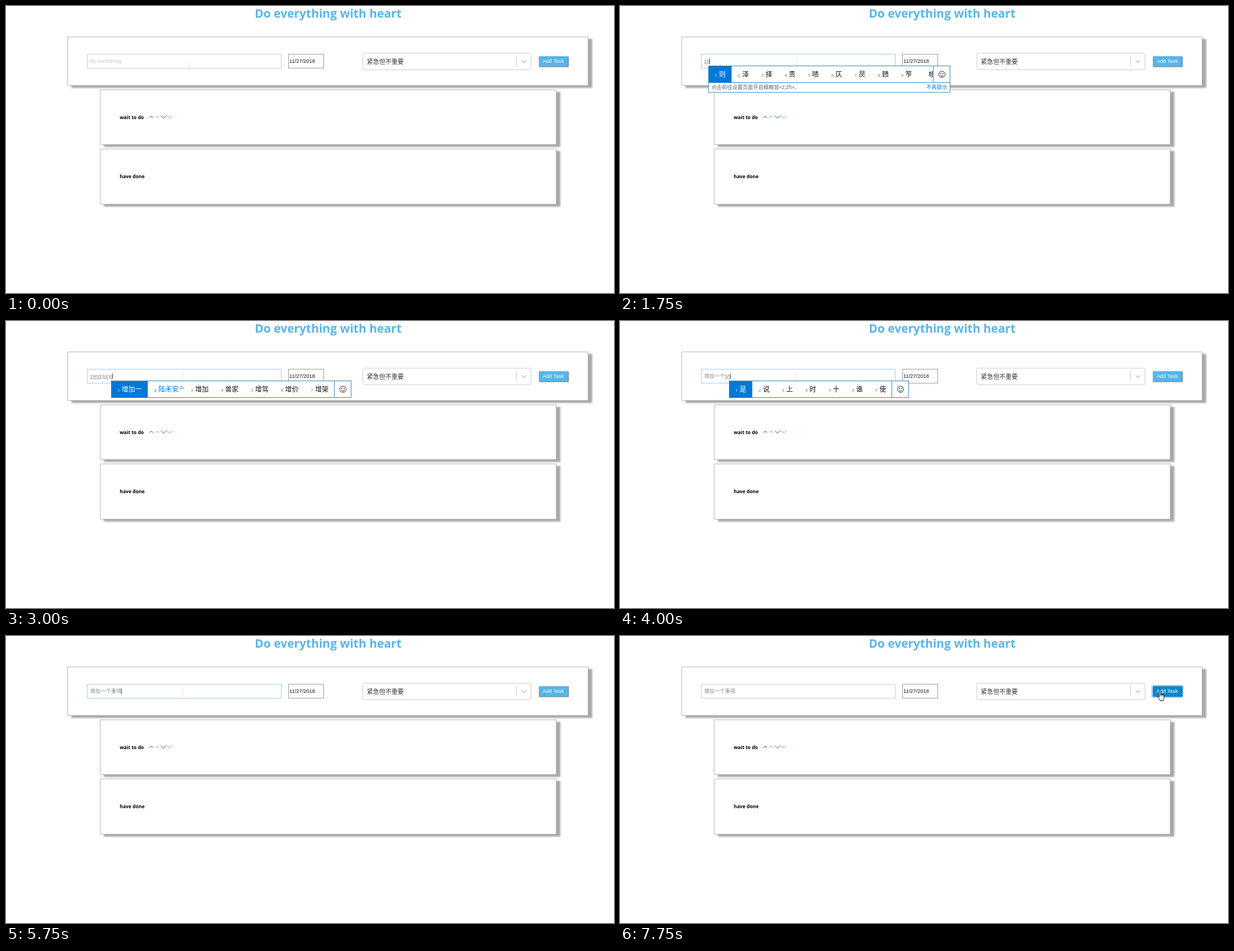
Animation of 1088 by 515 pixels, one loop 8 s. Source, as an HTML page:

```html
<!DOCTYPE html>
<html lang="zh-CN">
<head>
<meta charset="utf-8">
<title>Do everything with heart</title>
<style>
html, body { margin: 0; width: 100%; height: 100%; overflow: hidden; background: #fff; }
svg { display: block; width: 1088px; height: 515px; font: 9.33px "Liberation Sans", "Noto Sans CJK SC", "Noto Sans CJK", sans-serif; }
text { white-space: pre; }
path { fill: none; }
.panel { fill: #fff; stroke: #b8b8b8; filter: drop-shadow(7px 4px 1.4px #a8a8a8); }
.title { font: 700 21px "Open Sans", "Noto Sans", sans-serif; fill: #58b6ea; text-anchor: middle; }
.label { font: 700 8.6px "Open Sans", "Noto Sans", sans-serif; }
.box { fill: #fff; stroke: #ccc; }
.popup, .hint { font-family: "Noto Sans CJK SC", "Noto Sans CJK", sans-serif; }
.num { font: 7.6px "Noto Sans", sans-serif; }
</style>
</head>
<body>
<svg viewBox="0 0 1088 515">
  <text class="title" x="576.5" y="21">Do everything with heart</text>
  <rect class="panel" x="110.5" y="55.5" width="931" height="87"/>
  <rect class="panel" x="168.5" y="150.5" width="816" height="98"/>
  <rect class="panel" x="168.5" y="256.5" width="816" height="99"/>
  <text class="label" x="203.5" y="203.3">wait to do</text>
  <text class="label" x="203.5" y="309.3">have done</text>
  <path d="M257 200.5l3-3 3 3" stroke="#223"/>
  <path d="M267.5 200.5l3-3 3 3" stroke="#4a9ccc"/>
  <path d="M277 196.5l5 5 5-5" stroke="#224a66"/>
  <path d="M288 196.5l5 5 5-5" stroke="#4ba6d2"/>

  <rect id="input" class="box" x="145.5" y="86.5" width="347" height="25"/>
  <rect class="box" x="505.5" y="86.5" width="63" height="25" style="stroke:#999"/>
  <text x="507" y="102.2" fill="#111">11/27/2018</text>
  <rect class="box" x="638.5" y="84.5" width="301" height="30" rx="3"/>
  <text x="645.7" y="104.3" font-size="11" fill="#333">紧急但不重要</text>
  <path d="M913.5 90v18" stroke="#ccc"/>
  <path d="M922.5 97.5l4 4 4-4" stroke="#ccc" stroke-width="1.8"/>

  <rect id="ring" x="951.5" y="88.5" width="56" height="21.5" rx="2" fill="none" stroke="#a6cdef" stroke-width="1.6"/>
  <rect id="button" x="953.5" y="90" width="53" height="19" rx="1.5"/>
  <path id="bevel" d="M954 109h52.5V91" stroke="#777"/>
  <text x="960.2" y="102.2" fill="#fff">Add Task</text>

  <text id="typed" y="102.2"></text>
  <path id="caret" stroke="#555"/>
  <g id="popup"></g>
  <g id="pointer"></g>
</svg>
<script>
const $ = id => document.getElementById(id);
const BLUE = '#0078d7', EDGE = '#3385b8';

// IME steps: [time, committed, composing, candidates, fuzzy hint, minimum width]; "*" marks a cloud result
const typing = [
  [0, '', ''],
  [1500, '', 'z', '在 这 中 张 只 再 最 做 走 总', 'z,zh', 433],
  [1750, '', 'ze', '则 泽 择 责 啧 仄 昃 赜 笮 帻', 'z,zh', 433],
  [2000, '', 'zen', '怎 增 曾 赠 憎 谮 缯 甑 锃 罾', 'z,zh', 433],
  [2250, '', 'zeng', '增 曾 赠 憎 缯 甑 锃 罾 综 磳', 'z,zh', 443],
  [2500, '', "zeng'jia", '增加 增价 赠家 增驾 增架 曾家 曾加'],
  [3000, '', "zeng'jia'yi", '增加一 陆禾安* 增加 曾家 增驾 增价 增架'],
  [3250, '', "zeng'jia'yi'g", '增加一个 增加一 增加 曾家 增驾 增价 增架'],
  [3500, '', "zeng'jia'yi'ge", '增加一个 增加一格* 增加一各 增加一 增加亿 增加 曾家'],
  [3750, '增加一个', ''],
  [4000, '增加一个', 'sh', '是 说 上 时 十 谁 使'],
  [4250, '增加一个', 'shi', '是 时 使 事 十 式 市'],
  [4500, '增加一个', "shi'x", '实现 事项 施行 实习 属性 试下 时下'],
  [4750, '增加一个', "shi'xi", '实习 是系 时系 事细 石溪 世系 失悉'],
  [5000, '增加一个', "shi'xia", '试下 时下 是下 十下 示下 石峡 石厦'],
  [5250, '增加一个', "shi'xiang", '事项 试想 石像 是想 实像 十项 世相 时相', 's,sh', 433],
  [5750, '增加一个事项', '']
];

// [time, shape, x, y]
const moves = [
  [0, 'beam', 328, 108], [250, ''], [750, 'beam', 316, 100],
  [6500, 'arrow', 455, 118], [6750, 'arrow', 710, 136],
  [7000, 'arrow', 905, 126], [7250, 'hand', 961, 98]
];
const shapes = {
  beam: '<path d="M-2.5-5.5h5M0-5.5v11M-2.5 5.5h5" stroke="#e6e6e6"/>',
  arrow: '<path d="M0 0v13l3-2.8 2.2 5 2-.9-2.1-4.9h4z" style="fill:#fff" stroke="#000" stroke-width=".8"/>',
  hand: '<path d="M3.5 10V2q0-1.5 1.3-1.5t1.3 1.5v5q1-1 2.3 0 1-.8 2 .3 1.6-.5 1.6 1.2V12q0 2-1.3 3.5v2H4.8V16L.8 11q-.6-1.3.6-1.6 1 0 2.1 1.6z" style="fill:#fff" stroke="#000"/><path d="M6.1 7v3M8.4 7.5v2.5M10.4 8v2" stroke="#000" stroke-width=".7"/>'
};

const at = (list, t) => list.findLast(step => step[0] <= t);
const rect = (x, y, w, h, fill, stroke = 'none') =>
  `<rect x="${x}" y="${y}" width="${w}" height="${h}" fill="${fill}" stroke="${stroke}"/>`;
const text = (x, y, size, fill, str, more = '') =>
  `<text x="${x}" y="${y}" font-size="${size}" fill="${fill}" ${more}>${str}</text>`;

function popup(left, list, hint, minWidth = 0) {
  let x = 0, cells = '';
  list.split(' ').forEach((word, i) => {
    const cloud = word.endsWith('*');
    const chars = word.replace('*', '');
    const width = 29.7 + 12 * chars.length;
    const ink = i ? cloud ? BLUE : '#111' : '#fff';
    if (!i) cells += rect(0, 0, width, 30, BLUE);
    if (i < 9) cells += text(x + 11.4, 19.6, 7.6, i && !cloud ? '#777' : ink, i + 1, 'class="num"');
    cells += text(x + 19, 20.4, 12, ink, chars);
    if (cloud) cells += `<path transform="translate(${x + width - 9},9)" d="M1.5 5.5q-1.8-.5-1-2.2.6-.8 1.5-.6.8-2.2 2.8-1.6 1.2.4 1.4 1.6 1.6.2 1.4 1.7-.3 1.1-1.4 1.1z" stroke="${BLUE}" stroke-width=".8"/>`;
    if (i < 9 && !(hint && x + width > minWidth - 30)) x += width;
  });
  const w = Math.round(Math.max(x + 30.5, minWidth));
  const face = `<g transform="translate(${w - 15},15.5)"><path d="M-5.6 0a5.6 5.6 0 1 0 11.2 0a5.6 5.6 0 1 0-11.2 0M-3 1.5q3 3.6 6 0" stroke="#222"/><circle cx="-2" cy="-1.6" r=".9"/><circle cx="2" cy="-1.6" r=".9"/></g>`;
  const bar = hint ? rect(.5, 30.5, w - 1, 17.5, '#fff', EDGE) +
    text(5.5, 42.3, 9.33, '#666', `点击前往设置页面开启模糊音&lt;${hint}&gt;。`) +
    text(w - 5.5, 42.3, 9.33, BLUE, '不再提示', 'text-anchor="end"') : '';
  return `<g class="popup" transform="translate(${left},107)">` +
    rect(.5, .5, w - 1, 30, '#fff') + cells +
    rect(w - 30.5, .5, 30, 30, '#fff', EDGE) + face +
    rect(.5, .5, w - 1, 30, 'none', EDGE) + bar + '</g>';
}

function draw(t) {
  const [, done, composing, list, hint, minWidth] = at(typing, t);
  const [, shape, x, y] = at(moves, t);
  const focused = t >= 750 && t < 7500;
  const hover = t >= 7250, pressed = t >= 7500;
  const empty = !done && !composing;

  $('input').style.stroke = focused ? '#a4c9ea' : '#ccc';
  $('typed').setAttribute('x', 150.5);
  $('typed').setAttribute('fill', empty ? '#c4c4c4' : '#8a8a8a');
  $('typed').innerHTML = empty ? 'do something' :
    `${done}<tspan text-decoration="underline">${composing}</tspan>`;

  const end = 150.5 + (empty ? 0 : $('typed').getComputedTextLength());
  const blink = composing || (t < 1500 ? t < 1250 : t < 5750 || (t - 5750) % 1000 < 500);
  $('caret').setAttribute('d', focused && blink ? `M${Math.floor(end) + .5} 94v10` : '');
  $('popup').innerHTML = list ? popup(Math.round(end - 2.4), list, hint, minWidth) : '';

  $('button').setAttribute('fill', hover ? '#0b86cb' : '#55b5ea');
  $('button').setAttribute('stroke', hover ? '#3d94c9' : '#b4cfdf');
  $('bevel').style.display = pressed ? 'none' : '';
  $('ring').style.display = pressed ? '' : 'none';
  $('pointer').innerHTML = shape ? `<g transform="translate(${x + .5},${y + .5})">${shapes[shape]}</g>` : '';
}

let last = -1;
function tick(now) {
  const t = Math.floor(now % 8000 / 250) * 250;
  if (t !== last) draw(last = t);
  requestAnimationFrame(tick);
}
draw(0);
requestAnimationFrame(tick);
</script>
</body>
</html>
```
